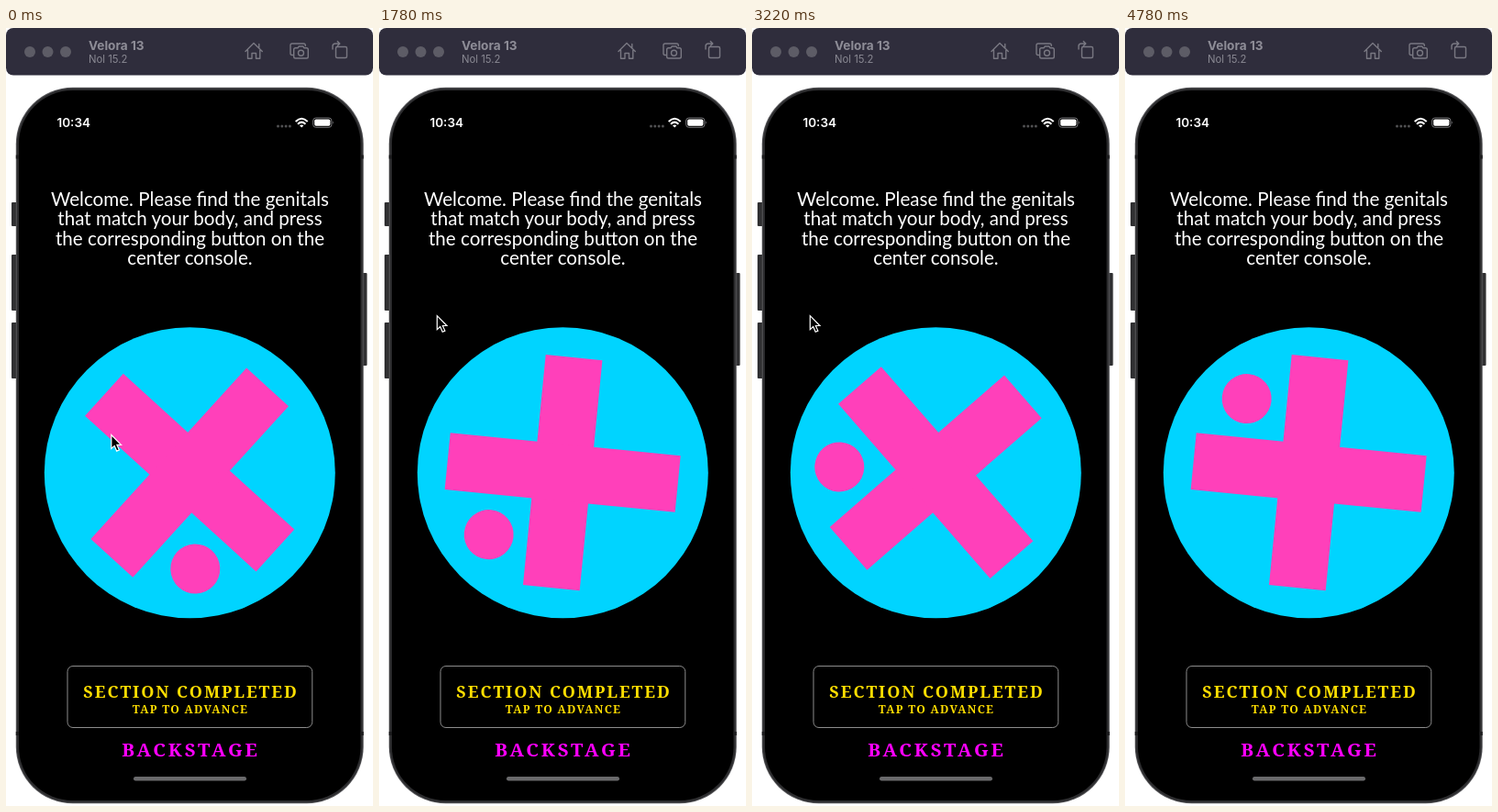
Write an HTML page that moves like this. It is 400x848 px and loops after 5.28 s.

```html
<!DOCTYPE html>
<html lang="en">
<head>
<meta charset="utf-8">
<title>Console</title>
<style>
  html, body { margin: 0; width: 100%; height: 100%; overflow: hidden; background: #fff; }
  svg { display: block; width: 100%; height: 100%; font-family: Inter, sans-serif; }
  .intro { font-family: Lato, sans-serif; font-size: 20.6px; fill: #fff; text-anchor: middle; }
  .deco { font-family: "Noto Serif", serif; font-weight: 900; text-anchor: middle; }
  .icon { fill: none; stroke: #797882; stroke-width: 1.4; stroke-linejoin: round; stroke-linecap: round; }
</style>
</head>
<body>
<svg viewBox="0 0 400 848">
  <!-- toolbar -->
  <rect width="400" height="51.5" rx="8" fill="#2f2d3c"/>
  <g fill="#5d5c66">
    <circle cx="26" cy="26" r="6"/>
    <circle cx="45.5" cy="26" r="6"/>
    <circle cx="65" cy="26" r="6"/>
  </g>
  <text x="90" y="24" font-size="13.6" font-weight="700" fill="#8e8d97">Velora 13</text>
  <text x="90" y="38" font-size="11.3" fill="#898892">Nol 15.2</text>
  <g class="icon">
    <path d="M261 25.5 270 16.5 279.3 25.5M263.5 24V33.2H268V27.5H272.5V33.2H276.8V24M275.8 21.5V17.5"/>
    <path d="M313 29.5H311.8Q310 29.5 310 27.5V18.8Q310 17 311.8 17H324.5Q326.3 17 326.3 18.8V19.5"/>
    <path d="M315.5 21.8H318L319.3 20H323.7L325 21.8H327.5Q329.3 21.8 329.3 23.6V31.2Q329.3 33 327.5 33H315.5Q313.7 33 313.7 31.2V23.6Q313.7 21.8 315.5 21.8Z"/>
    <circle cx="321.5" cy="27.2" r="3"/>
    <rect x="359.5" y="20.5" width="12" height="12" rx="1.5"/>
    <path d="M356 23V20Q356 17 359 17H363.5M361.3 14.5 363.8 17 361.3 19.5"/>
  </g>

  <!-- phone body -->
  <g fill="#303032">
    <rect x="6" y="190" width="6" height="26" rx="1"/>
    <rect x="6" y="247" width="6" height="61" rx="1"/>
    <rect x="6" y="321" width="6" height="61" rx="1"/>
    <rect x="388" y="267" width="5.5" height="101" rx="1"/>
  </g>
  <rect x="10.8" y="64.8" width="378.9" height="780.5" rx="62" fill="#57575a"/>
  <rect x="11.8" y="65.8" width="376.9" height="778.5" rx="61" fill="#2d2d2f"/>
  <rect x="14" y="68" width="372.5" height="774" rx="58.5" fill="#000"/>
  <path d="M10.8 140.5H14M386.5 140.5H389.7M10.8 769H14M386.5 769H389.7" stroke="#1d1d1f" stroke-width="4"/>

  <!-- status bar -->
  <text x="55.5" y="108" font-size="13.5" font-weight="600" fill="#fff">10:34</text>
  <g fill="#505052">
    <circle cx="296.5" cy="107" r="1.5"/>
    <circle cx="300.8" cy="107" r="1.5"/>
    <circle cx="305.1" cy="107" r="1.5"/>
    <circle cx="309.4" cy="107" r="1.5"/>
  </g>
  <g fill="none" stroke="#fff" stroke-width="2">
    <path d="M315.7 102Q322.2 95.6 328.7 102"/>
    <path d="M318 104.7Q322.2 100.6 326.4 104.7"/>
  </g>
  <path d="M320 106.3Q322.2 104.5 324.4 106.3L322.2 108.6Z" fill="#fff"/>
  <rect x="334.7" y="98" width="20.2" height="10.3" rx="3" fill="none" stroke="#77777a"/>
  <rect x="336.2" y="99.5" width="17.2" height="7.3" rx="1.7" fill="#fff"/>
  <path d="M356 101.5Q357.8 103.1 356 104.8Z" fill="#77777a"/>

  <g class="intro">
    <text x="200.5" y="194">Welcome. Please find the genitals</text>
    <text x="200.5" y="215.3">that match your body, and press</text>
    <text x="200.5" y="236.5">the corresponding button on the</text>
    <text x="200.5" y="257.7">center console.</text>
  </g>

  <!-- dial -->
  <circle cx="200.3" cy="484.8" r="158.5" fill="#00d4ff"/>
  <g id="cross" fill="#ff40ba">
    <rect x="-126.1" y="-31" width="252.2" height="62"/>
    <rect x="-31" y="-126.1" width="62" height="252.2"/>
    <circle cx="75.1" cy="73.5" r="27"/>
  </g>

  <!-- controls -->
  <rect x="67" y="695.5" width="266.8" height="67" rx="6" fill="none" stroke="#8c8c8c"/>
  <text class="deco" x="201.5" y="730" font-size="18" letter-spacing="1.9" fill="#ffde00">SECTION COMPLETED</text>
  <text class="deco" x="201" y="747" font-size="12.2" letter-spacing="1.3" fill="#ffde00">TAP TO ADVANCE</text>
  <text class="deco" x="201.5" y="794" font-size="20.5" letter-spacing="2.8" fill="#f0f">BACKSTAGE</text>
  <rect x="139" y="816" width="123" height="4.5" rx="2.2" fill="#6a6a6c"/>

  <path id="cursor" d="M0 0V15L3.4 11.9 5.9 17.6 8.6 16.4 6.1 10.8H10.7Z" fill="#000" stroke="#fff" stroke-width="1.2"/>
</svg>
<script>
  const LOOP = 5280, LAST = 43, FPS = 9;
  const MOVE = 5, LEAVE = 31, GONE = 36;
  const cross = document.getElementById('cross');
  const cursor = document.getElementById('cursor');
  const startOf = n => Math.round(n * 100 / FPS) * 10;
  const mix = (a, b, k) => a + (b - a) * k;

  // Eased progress from step a to step b.
  function ease(n, a, b) {
    const k = Math.min(Math.max((n - a) / (b - a), 0), 1);
    return k * k * (3 - 2 * k);
  }

  function stepAt(ms) {
    let n = LAST;
    while (startOf(n) > ms) n--;
    return n;
  }

  // The picture advances nine times a second and rests on its last step.
  function draw(ms) {
    const n = stepAt(ms);
    const angle = 42.3 + 30 * n / FPS;
    cross.setAttribute('transform', `translate(200.2 484.6) rotate(${angle})`);

    const k = ease(n, 0, MOVE);
    const x = mix(114.8, 63.3, k);
    const y = mix(443.5, 313.7, k) - 27 * ease(n, LEAVE, GONE - 1);
    cursor.setAttribute('transform', `translate(${x} ${y})`);
    cursor.setAttribute('visibility', n < GONE ? 'visible' : 'hidden');
  }

  const begin = performance.now();
  function tick() {
    draw((performance.now() - begin) % LOOP);
    requestAnimationFrame(tick);
  }
  tick();
</script>
</body>
</html>
```
